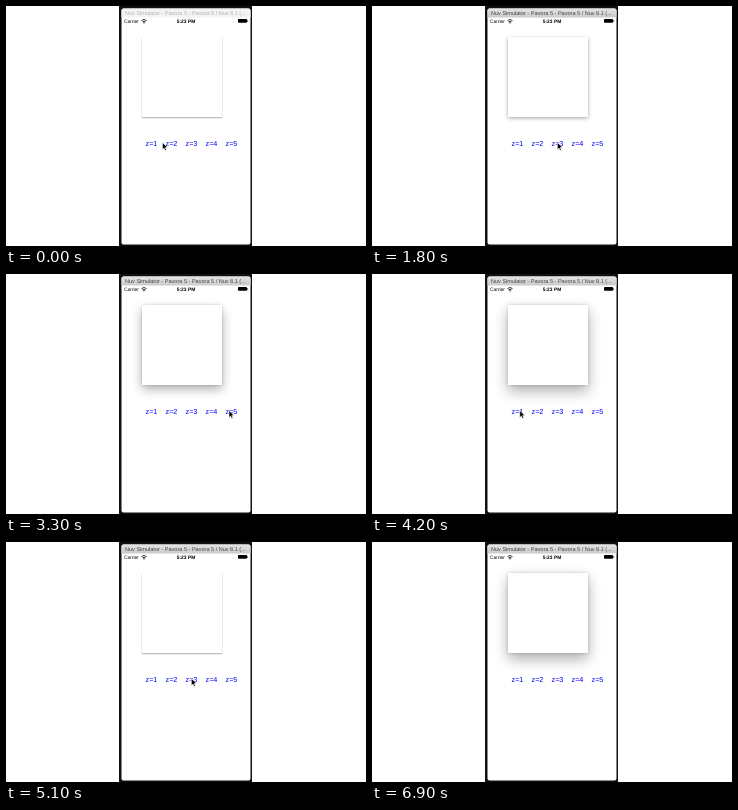
An HTML page that plays this animation: 360x240 px, repeating every 7200 ms.

```html
<!DOCTYPE html>
<html lang="en">
<head>
<meta charset="utf-8">
<title>Card elevation</title>
<style>
  html, body { margin: 0; width: 100%; height: 100%; overflow: hidden; background: #fff; }
  svg { position: absolute; left: 0; top: 0; }
  text { font-family: "Liberation Sans", Arial, sans-serif; text-rendering: geometricPrecision; }
  #card { position: absolute; left: 136px; top: 31px; width: 80px; height: 80px; background: #fff; }
</style>
</head>
<body>
<svg width="360" height="240" viewBox="0 0 360 240">
  <defs>
    <linearGradient id="active" x2="0" y2="1">
      <stop offset="0" stop-color="#e6e6e6"/>
      <stop offset="1" stop-color="#cbcbcb"/>
    </linearGradient>
    <clipPath id="window"><rect x="115.5" y="2.5" width="129" height="236" rx="2"/></clipPath>
  </defs>
  <rect x="113" width="133" height="240" fill="#111"/>
  <g clip-path="url(#window)">
    <rect x="115" y="2" width="130" height="237" fill="#fff"/>
    <rect id="bar" x="115" y="2" width="130" height="9.5"/>
  </g>
  <text id="title" x="119" y="8.9" font-size="5.55">Nuv Simulator - Pavora 5 - Pavora 5 / Nuv 8.1 (...</text>

  <text x="118" y="17.2" font-size="4.9">Carrier</text>
  <g fill="none" stroke="#000" stroke-width=".8">
    <path d="M135.500 14.600q2.500-2.200 5 0M136.500 15.900q1.500-1.200 3 0"/>
    <circle cx="138" cy="16.9" r=".3"/>
  </g>
  <text x="180" y="17.2" font-size="4.9" font-weight="bold" text-anchor="middle">5:23 PM</text>
  <rect x="232" y="13.1" width="9" height="3.7" rx=".7"/>
  <rect x="241.3" y="14.3" width=".8" height="1.400"/>

  <g id="links" fill="#00f" font-size="7.25"></g>
  <path id="cursor" d="M0 0V7L1.600 5.600L2.700 8L3.900 7.500L2.800 5.100H5z"
        stroke="#fff" stroke-width=".5"/>
</svg>
<div id="card"></div>

<script>
const LOOP = 7200;
const TICK = 300;
const ACTIVE_AT = 1200;
const LEAVE_AT = 6600;

const clicks = [
  { time: 1500, z: 2 }, { time: 2100, z: 3 }, { time: 3000, z: 4 }, { time: 3600, z: 5 },
  { time: 4500, z: 1 }, { time: 5400, z: 3 }, { time: 6300, z: 5 }
];

const byId = id => document.getElementById(id);
const easeOut = p => 1 - (1 - p) ** 3;
const clamp = p => Math.min(1, Math.max(0, p));
const linkTip = z => 129 + 18.8 * z;

// The pointer wanders until the window is active, then glides to each link
// and rests on it one tick before the click.
function pointerX(time) {
  if (time < ACTIVE_AT) {
    const turn = time / ACTIVE_AT;
    return 156.5 + 10 * turn - 16 * Math.sin(2 * Math.PI * turn);
  }
  let x = linkTip(clicks[0].z);
  for (const click of clicks) {
    const progress = clamp((time - click.time + 3 * TICK) / (2 * TICK));
    x += (linkTip(click.z) - x) * easeOut(progress);
  }
  return x;
}

function elevation(time) {
  const last = clicks.findLast(click => click.time <= time);
  return last ? last.z : 1;
}

// A wide shadow that sinks with height, and a tight one around the edge.
function shadow(z) {
  const wide = `0 ${1.3 * z - 0.7}px ${3 * z - 1.8}px rgba(0,0,0,.32)`;
  const tight = `0 0 ${0.6 * z}px rgba(0,0,0,.18)`;
  return `${wide}, ${tight}`;
}

function draw(now) {
  const time = Math.floor((now % LOOP) / TICK) * TICK;
  const active = time >= ACTIVE_AT;
  byId("bar").setAttribute("fill", active ? "url(#active)" : "#f3f3f3");
  byId("title").setAttribute("fill", active ? "#404040" : "#b4b4b4");
  byId("cursor").setAttribute("transform", `translate(${pointerX(time)} 136.5)`);
  byId("cursor").setAttribute("visibility", time < LEAVE_AT ? "visible" : "hidden");
  byId("card").style.boxShadow = shadow(elevation(time));
}

for (let z = 1; z <= 5; z++) {
  byId("links").innerHTML += `<text x="${119.5 + 20 * z}" y="139.7">z=${z}</text>`;
}

const start = performance.now();
function frame() {
  draw(performance.now() - start);
  requestAnimationFrame(frame);
}
frame();
</script>
</body>
</html>
```
